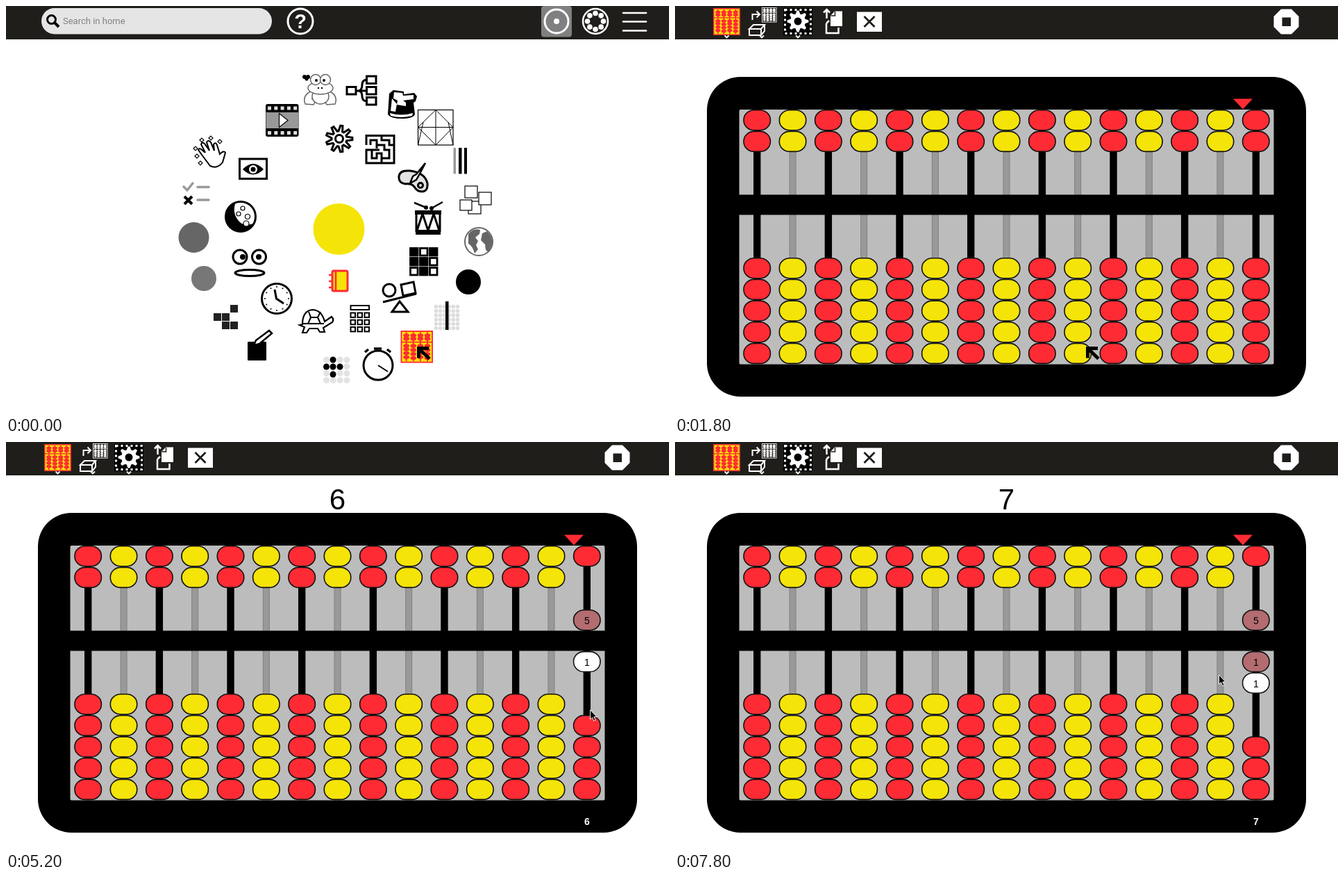
Animation of 955 by 587 pixels, one loop 8 s. Source, as an HTML page:

```html
<!DOCTYPE html>
<html lang="en">
<head>
<meta charset="utf-8">
<title>Abacus</title>
<style>
html, body { margin: 0; width: 100%; height: 100%; overflow: hidden; background: #fff; }
svg { display: block; width: 955px; height: 587px; }
text { font-family: "Liberation Sans", Arial, sans-serif; text-anchor: middle; }
.line { fill: none; stroke: #000; stroke-width: 3; }
.thin { fill: #fff; stroke: #000; stroke-width: 1.2; }
.grey { fill: #fff; stroke: #666; stroke-width: 1.5; }
.white { fill: none; stroke: #fff; stroke-width: 2.5; }
.search { font: 13px Roboto, sans-serif; fill: #808080; text-anchor: start; }
</style>
</head>
<body>
<svg viewBox="0 0 955 587">
  <rect width="955" height="48" fill="#201e1b"/>
  <g id="home"></g>
  <g id="tools"></g>
  <g id="abacus"></g>
  <path id="bigCursor" d="M594.5 506.5V492.5H609M595 493L610 507.5" fill="none" stroke="#000" stroke-width="5"/>
  <path id="pointer" d="M0 0V13.5L3 10.8L5.2 15.8L7.5 14.8L5.4 10H9.5Z" fill="#000" stroke="#fff" stroke-width=".9"/>
</svg>
<script>
const RED = '#ff2b34', YELLOW = '#f5e408', LOOP = 8000, STEP = 200;
const byId = id => document.getElementById(id);
const range = (n, fn) => Array.from({ length: n }, (_, i) => fn(i)).join('');
const rect = (x, y, w, h, attrs = '') => `<rect x="${x}" y="${y}" width="${w}" height="${h}" ${attrs}/>`;
const circle = (x, y, r, attrs = '') => `<circle cx="${x}" cy="${y}" r="${r}" ${attrs}/>`;
const oval = (x, y, rx, ry, attrs = '') => `<ellipse cx="${x}" cy="${y}" rx="${rx}" ry="${ry}" ${attrs}/>`;
const path = (d, attrs = 'class="line"') => `<path d="${d}" ${attrs}/>`;
const fill = color => `fill="${color}"`;

function dots(cols, rows, x, y, gap, r, color) {
  return range(cols * rows, i => circle(x + i % cols * gap, y + Math.floor(i / cols) * gap, r, fill(color)));
}

function gear(cx, cy, teeth, inner, outer, attrs) {
  const points = Array.from({ length: teeth * 4 }, (_, i) => {
    const angle = (i - .5) * Math.PI / teeth / 2;
    const r = i % 4 < 2 ? outer : inner;
    return `${(cx + r * Math.cos(angle)).toFixed(1)},${(cy + r * Math.sin(angle)).toFixed(1)}`;
  });
  return `<polygon points="${points.join(' ')}" ${attrs}/>`;
}

// Small abacus: four rods of beads on a square panel.
function miniAbacus(x, y, size, panel, bead) {
  const u = size / 40;
  const columns = range(4, c => {
    const cx = 7 + c * 8.7;
    return rect(cx - .8, 2, 1.6, 36, fill(bead)) +
      [6, 10, 19, 23, 28, 33].map(cy => oval(cx, cy + (c % 2 && cy > 20 ? 1 : 0), 3.7, 2.4, fill(bead))).join('');
  });
  return `<g transform="translate(${x} ${y}) scale(${u})">` +
    rect(.8, .8, 38.4, 38.4, `fill="${panel}" stroke="${bead}" stroke-width="1.6"`) +
    columns + rect(1, 13.5, 38, 1.5, fill(bead)) + '</g>';
}

function homeBar() {
  return rect(51, 3, 332, 37.5, 'rx="18.7" fill="#e5e5e5"') +
    circle(65.5, 19.5, 6, 'class="line"') + path('M70 24L76 30', 'stroke="#000" stroke-width="4"') +
    '<text class="search" x="82" y="26">Search in home</text>' +
    circle(424, 22, 18, 'class="white" style="stroke-width:3"') +
    '<text x="424" y="32" font-size="29" font-weight="bold" fill="#fff">?</text>' +
    rect(771, 0, 44, 44.5, 'rx="4" fill="#808080"') +
    circle(793, 22, 17, 'class="white" style="stroke-width:3"') + circle(793, 22, 4, fill('#fff')) +
    circle(849, 22, 18, 'class="white"') +
    range(8, i => circle(849 + 11.5 * Math.cos(i * Math.PI / 4), 22 + 11.5 * Math.sin(i * Math.PI / 4), 3.8, fill('#fff'))) +
    path('M889 10H922M889 22.5H922M889 35.5H922', 'stroke="#fff" stroke-width="2.7" stroke-linecap="round"');
}

function upperIcons() {
  return [
    // frog and fly
    path('M441 122Q426 128 431 141L443 142Q447 138 440 133M464 122Q479 128 474 141L462 142Q458 138 465 133', 'class="grey"'),
    oval(453, 130, 12, 11, 'class="grey"'), oval(453, 118, 18, 9, 'class="grey"'),
    circle(446, 106, 7.5, 'class="grey"'), circle(460, 106, 7.5, 'class="grey"'),
    circle(447, 107, 2), circle(458, 107, 2), circle(450, 118, 1.2), circle(455, 118, 1.2),
    circle(430, 102, 3), circle(435, 102, 3), circle(433, 105, 2.5),
    // tree diagram
    rect(491, 116.5, 13, 10.5, 'class="line"'),
    [101, 116.5, 131.5].map(y => rect(519.5, y, 13.5, 10.5, 'class="line"')).join(''),
    path('M504 122H519M508 122Q513 121 513 113Q513 107 519 106M508 122Q513 123 513 130Q513 136 519 137'),
    // carved block
    path('M552 126L558 121L573 123L573 127L588 125L592 130L590 137L587 139L589 156Q586 162 570 162Q554 162 550 156Z', ''),
    path('M559 124L571 125L572 129L587 128V134L572 136L576 139V144L563 142L564 136L558 133ZM556 133L554 151L561 152L563 141ZM553 154Q569 159 586 154L585 158Q568 162 554 158Z', fill('#fff')),
    // folded square
    rect(593.5, 149.5, 50.5, 50.5, 'class="thin"'),
    path('M619 149.5V200M593.5 174.5H644M593.5 174.5L619 149.5L644 174.5M593.5 174.5L619 200L644 174.5M601 167L593.5 200M637 167L644 200', 'fill="none" stroke="#000"'),
    // film
    rect(374, 141, 47.5, 47, 'rx="3"'), rect(374.5, 153, 46.5, 23, fill('#999')),
    range(5, i => rect(377 + i * 9.3, 144.5, 5, 5, fill('#ddd')) + rect(377 + i * 9.3, 180, 5, 5, fill('#ddd'))),
    path('M393.5 154.5L406 164.5L393.5 174.5Z', 'class="thin"'),
    // gear and maze
    gear(480, 191, 9, 11, 19, 'class="line"'), circle(480, 191, 5.5, 'class="line"'),
    path('M519 200V186.5H559V226H519V207H527V219H534V212H541V219H552V207H545V200H534V205M525 200V193H534V200M541 186V193H552V200H559M527 207H538M541 219V226'),
    // palette and brush
    path('M566 245Q567 236 581 237Q603 239 607 255Q608 267 599 267Q592 267 588 260Q584 255 576 256Q565 255 566 245Z', 'fill="#e2e2e2" stroke="#000" stroke-width="3"'),
    circle(597, 258, 3.5, 'class="line"'),
    path('M604 226L591 242L586 245L582 255L591 250L594 245Z', 'fill="#fff" stroke="#000" stroke-width="2.5"'),
    // bars
    rect(644.5, 204, 3.5, 37.5, fill('#999')), rect(652, 204, 4.5, 37.5), rect(660, 204, 4, 37.5),
    // overlapping cards
    rect(666, 281, 18, 18, 'class="thin"'), rect(654, 279, 17, 15, 'class="thin"'),
    rect(681, 268, 18, 18, 'class="thin"'), rect(661, 259, 18, 17, 'class="thin"'),
    // hand with sparkles
    path('M282 214L277 207Q278 204 281 206L287 211L281 199Q282 195 286 198L293 208L289 196Q291 192 295 196L300 208L299 199Q302 195 304 200L308 213Q314 207 316 211L312 225Q304 235 294 230Z', 'fill="#fff" stroke="#000" stroke-width="2"'),
    [[282, 193], [295, 190], [308, 195], [273, 205], [275, 216], [280, 226]].map(([x, y]) =>
      path(`M${x - 3} ${y}l3 -3l3 3l-3 3Z`, 'class="thin"')).join(''),
    // eye
    rect(336.5, 220, 39, 28.5, 'class="line"'),
    path('M341 235Q356 219 371 235Q356 250 341 235Z', ''), circle(356, 235, 6, fill('#fff')), circle(356, 235, 3.5),
    // checklist
    path('M256 260L261 265L269 255M276 260.5H292M276 279H292', 'fill="none" stroke="#999" stroke-width="3.5" stroke-linecap="round"'),
    path('M257 274L268 285M268 274L257 285', 'stroke="#000" stroke-width="4"'),
    // moon
    circle(338, 303, 21.5, 'fill="#fff" stroke="#000" stroke-width="3"'),
    path('M331 282Q321 285 317 303Q319 324 341 324Q354 322 357 313Q342 318 335 309Q325 297 331 282Z', ''),
    circle(341, 291, 3, 'class="thin"'), circle(348, 303, 3.5, 'class="thin"'), circle(335, 299, 3, 'class="thin"'), circle(346, 313, 4, 'class="thin"'),
    // drum
    path('M588 283L605 290M629 282L613 291', 'stroke="#000" stroke-width="2.5"'), circle(605, 290, 3), circle(613, 291, 3),
    rect(589, 294, 38, 6), rect(590, 322, 36, 7),
    path('M591 298V325M625 298V325M592 323L600 299L608 323L616 299L624 323'),
    // globe
    circle(681, 339, 20, 'class="grey" style="stroke-width:2"'),
    path('M666 328Q673 319 683 322L682 328L676 333L680 338L677 344L680 350L675 356Q672 345 666 342ZM686 327L693 324Q702 333 700 343L695 354L691 351L690 343L684 337Z', fill('#666'))
  ].join('');
}

function lowerIcons() {
  return [
    circle(270.5, 333, 22, fill('#666')), circle(285, 392, 18, fill('#777')), circle(666, 397, 18),
    circle(479.5, 321, 37, fill(YELLOW)),
    // journal
    rect(470, 381, 22, 29, `rx="2" fill="${YELLOW}" stroke="${RED}" stroke-width="3"`),
    path('M475 381V410M465 387H471M465 396H471M465 405H471', `stroke="${RED}" stroke-width="2.5"`),
    // face
    circle(337, 361, 10, 'class="line"'), circle(364.5, 361, 10, 'class="line"'),
    circle(341, 361, 4), circle(364, 361, 4), oval(351, 384, 21, 4.5, 'class="line"'),
    // clock
    circle(390, 421, 21.5, 'class="line"'), path('M387 408L389.5 421L400 428'),
    range(12, i => circle(390 + 17 * Math.cos(i * Math.PI / 6), 421 + 17 * Math.sin(i * Math.PI / 6), 1)),
    // blocks
    [[323, 430], [299, 442], [311, 442], [311, 454], [323, 454]].map(([x, y]) => rect(x, y, 11, 11, fill('#222'))).join(''),
    // turtle
    path('M427 458Q427 438 442 437Q455 438 459 454L469 447Q473 451 470 455L457 463L459 469H452L449 464H437L433 470H427L430 462L423 459Z', 'fill="#fff" stroke="#000" stroke-width="2.2"'),
    path('M428 457H458M436 440L439 448H449L453 440M439 448L435 457M449 448L453 457', 'fill="none" stroke="#000" stroke-width="2"'),
    // calculator
    rect(496.5, 431, 26.5, 6, 'class="line" style="stroke-width:2"'),
    range(9, i => rect(496.5 + i % 3 * 10, 441.5 + Math.floor(i / 3) * 10.2, 6.5, 6.5, 'class="line" style="stroke-width:2"')),
    // balance
    circle(552, 409, 9, 'class="line"'), path('M543 426L591 414M567 425L556 440H579ZM569 401L587 397L590 413L572 417Z'),
    // grid
    range(9, i => rect(582.5 + i % 3 * 14, 348.5 + Math.floor(i / 3) * 14, 10.5, 10.5,
      `fill="${[0, 2, 3, 4, 7].includes(i) ? '#000' : '#fff'}" stroke="#000" stroke-width="2.8"`)),
    // dotted panel
    dots(6, 6, 619.5, 432.5, 6.2, 2.8, '#ddd'), rect(633, 425, 4.5, 41),
    // pencil and square
    rect(348, 483, 27, 27, 'rx="1"'),
    path('M357 488L360 481L379 467L383 471L365 486Z', 'fill="#fff" stroke="#000" stroke-width="2.5"'),
    // dot pattern
    dots(4, 4, 461.5, 509, 9.8, 4.5, '#e3e3e3'),
    [[471, 509], [461.5, 519], [471, 519], [481, 519], [471, 530]].map(([x, y]) => circle(x, y, 4.5)).join(''),
    // stopwatch
    circle(536, 517, 21, 'class="line"'), path('M536 517L550 526', 'stroke="#000" stroke-width="2"'),
    path('M530 493H541M517 498L522 494M554 498L549 494', 'stroke="#000" stroke-width="3.5"'),
    miniAbacus(568.5, 467, 46.5, YELLOW, RED)
  ].join('');
}

function toolBar() {
  return miniAbacus(55, 3, 39, YELLOW, RED) +
    miniAbacus(125, 2, 21.5, '#201e1b', '#fff') +
    path('M111.5 20V12H121M117.5 7.5L122 12L117.5 16.5M107 33L113 27H129L124 33ZM107 33V42H124V33M124 42L129 36V27', 'class="white" style="stroke-width:2"') +
    rect(156, 3, 42, 39) +
    rect(158.5, 5.5, 37, 34, 'class="white" style="stroke-width:3;stroke-dasharray:3 4"') +
    gear(177, 22, 8, 11, 15.5, fill('#fff')) + circle(177, 22, 5.5) +
    path('M218.5 18V5M214 9.5L218.5 5L223 9.5M218 25V39H235.5V31M218 25L222 21', 'class="white"') +
    path('M230 7.5H241V29H224V14Z', fill('#fff')) + path('M224.5 14H230.5V8', 'fill="none" stroke="#201e1b" stroke-width="1.5"') +
    rect(262, 8.5, 36, 28.5, fill('#fff')) + path('M272.5 15L287.5 30M287.5 15L272.5 30', 'stroke="#201e1b" stroke-width="2.8"') +
    path('M873 4.5H888L898.5 15V30L888 40.5H873L862.5 30V15Z', fill('#fff')) + rect(874.5, 16.5, 12.5, 12.5, fill('#201e1b')) +
    path('M71.5 42.5L74.5 45.5L77.5 42.5', 'class="white" style="stroke-width:1.8"') +
    `<g id="chevrons">${[125, 177].map(x => path(`M${x - 3} 42.5l3 3l3 -3`, 'class="white" style="stroke-width:1.8"')).join('')}</g>`;
}

const beadShape = (x, y, color) =>
  rect(x - 19.2, y - 14.5, 38.4, 29, `rx="15" ry="14" fill="${color}" stroke="#111" stroke-width="1.6"`);

function abacusBoard() {
  const columns = range(15, c => {
    const x = 118.2 + c * 51.33, odd = c % 2, last = c === 14;
    const rod = odd ? rect(x - 4.5, 150, 9, 364, 'fill="#999" stroke="#808080"') : rect(x - 5.2, 150, 10.4, 364);
    const rows = [164.2, 194.9, 377.2, 407.9, 438.6, 469.2, 499.9];
    return rod + rows.map((y, r) => last && [1, 2, 3].includes(r) ? '' : beadShape(x, y, odd ? YELLOW : RED)).join('');
  });
  return rect(46, 102, 863, 460, 'rx="48"') + rect(92.5, 149, 770, 366.5, 'rx="2" fill="#bcbcbc"') +
    columns + rect(92, 271.5, 771, 29) +
    path('M804 133.5H832L818 148.5Z', fill(RED)) +
    '<g id="moving"></g>' +
    '<text id="total" x="477.5" y="97" font-size="42"></text>' +
    '<text id="digit" x="837" y="550.5" font-size="14" font-weight="bold" fill="#fff"></text>';
}

// Beads of the last rod that get pushed to the bar, in order.
const MOVES = [
  { at: 3400, value: 5, from: 194.9, to: 256.2 },
  { at: 4800, value: 1, from: 377.2, to: 316.1 },
  { at: 6600, value: 1, from: 407.9, to: 346.8 }
];

// time, x, y of the pointer tip
const POINTER = [
  [2200, 600, 490], [3000, 847.5, 248.5], [3400, 847.5, 248.5], [4200, 842, 376],
  [4800, 842, 376], [5600, 841, 395], [6800, 841, 395], [7800, 783.5, 335]
];

function pointerAt(t) {
  const next = POINTER.findIndex(key => key[0] > t);
  if (next < 0) return POINTER[POINTER.length - 1].slice(1);
  if (next === 0) return POINTER[0].slice(1);
  const [t0, x0, y0] = POINTER[next - 1], [t1, x1, y1] = POINTER[next];
  const u = (t - t0) / (t1 - t0), ease = u * u * (3 - 2 * u);
  return [x0 + (x1 - x0) * ease, y0 + (y1 - y0) * ease];
}

function lastRod(t) {
  const done = MOVES.filter(move => t >= move.at).length;
  return MOVES.map((move, i) => {
    if (i >= done) return beadShape(836.8, move.from, RED);
    return beadShape(836.8, move.to, i === done - 1 ? '#fff' : '#b36c70') +
      `<text x="836.8" y="${move.to + 6}" font-size="14">${move.value}</text>`;
  }).join('');
}

byId('home').innerHTML = homeBar() + upperIcons() + lowerIcons();
byId('tools').innerHTML = toolBar();
byId('abacus').innerHTML = abacusBoard();

const show = (id, on) => { byId(id).style.display = on ? '' : 'none'; };

function draw(t) {
  show('home', t < 400);
  show('tools', t >= 600);
  show('chevrons', t >= 1800);
  show('abacus', t >= 1800);
  show('bigCursor', t < 2200);
  show('pointer', t >= 2200);
  byId('pointer').setAttribute('transform', `translate(${pointerAt(t)})`);
  byId('moving').innerHTML = lastRod(t);
  const sum = MOVES.reduce((total, move) => total + (t >= move.at ? move.value : 0), 0);
  byId('total').textContent = byId('digit').textContent = sum || '';
}

const start = performance.now();
let shown = -1;
function tick() {
  const elapsed = (performance.now() - start) % LOOP;
  const t = Math.floor(elapsed / STEP) * STEP;
  if (t !== shown) draw(shown = t);
  requestAnimationFrame(tick);
}
tick();
</script>
</body>
</html>
```
